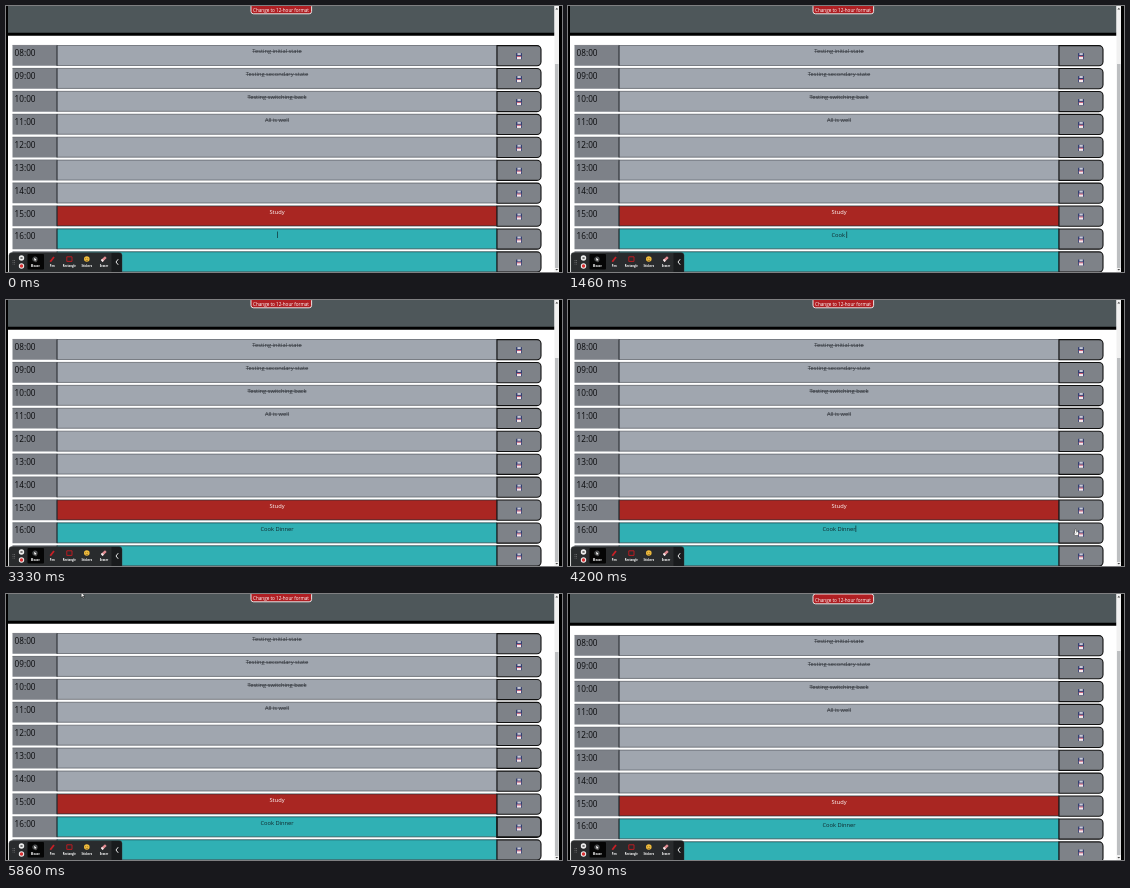
An HTML page with a canvas that plays this animation: 556 px wide and 266 px high, repeating every 8 s.

```html
<!DOCTYPE html>
<html lang="en">
<head>
<meta charset="utf-8">
<title>Day planner</title>
<style>
  html, body { margin: 0; width: 100%; height: 100%; overflow: hidden; background: #000; }
  canvas { display: block; width: 556px; height: 266px; }
</style>
</head>
<body>
<canvas id="stage"></canvas>
<script>
const W = 556, H = 266, LOOP = 8000;
const canvas = document.getElementById('stage');
const ctx = canvas.getContext('2d');
const ratio = window.devicePixelRatio || 1;
canvas.width = W * ratio;
canvas.height = H * ratio;

const FONT = '"Open Sans", sans-serif';
const PITCH = 22.92, ROW_H = 20.6;
const PAST = '#a0a6af', NOW = '#a92622', FUTURE = '#30b0b4';
const notes = ['Testing initial state', 'Testing secondary state', 'Testing switching back',
  'All is well', '', '', '', 'Study'];

// Typing: moment at which each character of the note appears.
const typed = 'Cook Dinner';
const keyTimes = [480, 680, 860, 1060, 1280, 1600, 1800, 2000, 2200, 2400, 2730];
const SAVE_TIME = 4270, SCROLL_TIME = 6500;

// Pointer stops: time, x, y.
const pointerPath = [
  [3530, 330, 234], [4000, 508, 232], [4400, 508, 232], [5700, 76, 0], [7200, 76, 0]
];

function rect(x, y, w, h, fill, stroke, line = 1, radius = 0) {
  ctx.beginPath();
  ctx.roundRect(x, y, w, h, radius);
  if (fill) { ctx.fillStyle = fill; ctx.fill(); }
  if (stroke) { ctx.strokeStyle = stroke; ctx.lineWidth = line; ctx.stroke(); }
}

function circle(x, y, r, fill) {
  ctx.beginPath();
  ctx.arc(x, y, r, 0, Math.PI * 2);
  ctx.fillStyle = fill;
  ctx.fill();
}

function polyline(points, stroke, line, fill) {
  ctx.beginPath();
  points.forEach(([x, y]) => ctx.lineTo(x, y));
  if (fill) { ctx.closePath(); ctx.fillStyle = fill; ctx.fill(); }
  if (stroke) { ctx.strokeStyle = stroke; ctx.lineWidth = line; ctx.stroke(); }
}

function text(str, x, y, size, color, align = 'center', weight = 400) {
  ctx.font = `${weight} ${size}px ${FONT}`;
  ctx.textAlign = align;
  ctx.fillStyle = color;
  ctx.fillText(str, x, y);
  return ctx.measureText(str).width;
}

function floppy(x, y) {
  rect(x - 3, y - 3, 6, 6.2, '#353f70', null, 0, 0.5);
  rect(x - 1.6, y - 3, 3.4, 2, '#c9cad6');
  rect(x - 2.1, y, 4.2, 3.1, '#f3e7ea');
  rect(x - 2.1, y, 4.2, 0.9, '#c8506b');
}

function header() {
  rect(2, -4, 546.5, 31, '#4e575a');
  rect(0, 26.8, 548.5, 3, '#000');
  rect(245, -2, 60.6, 9.8, '#b01f23', '#f4f4f4', 0.9, 2.4);
  text('Change to 12-hour format', 275, 5.6, 4.6, '#fff');
}

function caretVisible(t) {
  if (t >= SAVE_TIME) return false;
  const lastKey = Math.max(0, ...keyTimes.filter(k => k <= t));
  return (t - lastKey) % 1000 < 500;
}

function row(i, t) {
  const y = 39.2 + i * PITCH;
  const fill = i < 7 ? PAST : i === 7 ? NOW : FUTURE;
  rect(6.5, y, 44.5, ROW_H, '#7d8188');
  rect(51, y + 0.3, 440, ROW_H - 0.6, fill, i < 7 ? '#555a61' : '#173338', 0.7);
  polyline([[51, y], [51, y + ROW_H]], '#25282b', 0.8);
  polyline([[6.5, y + 0.2], [51, y + 0.2]], '#5c6067', 0.5);
  text(`${String(8 + i).padStart(2, '0')}:00`, 8.6, y + 10.9, 8.2, '#090a0c', 'left');

  const focused = i === 8 && t >= SAVE_TIME && t < SCROLL_TIME;
  rect(491, y + 0.4, 44, ROW_H - 0.4, '#7e8288', '#111', focused ? 1.6 : 1.1, [0, 4, 4, 0]);
  floppy(513, y + 10.9);

  if (i === 8) {
    const note = typed.slice(0, keyTimes.filter(k => k <= t).length);
    const width = text(note, 271, y + 8, 5.72, '#10272b');
    if (caretVisible(t)) rect(271 + width / 2, y + 2.9, 0.6, 6.6, '#08191b');
  } else if (notes[i]) {
    const past = i < 7;
    const width = text(notes[i], 271, y + 8, 5.72, past ? '#30343a' : '#fff');
    if (past) rect(271 - width / 2, y + 5.8, width, 0.6, '#30343a');
  }
}

function scrollbar(shift) {
  rect(548.5, 0, 4.5, H, '#f1f1f1');
  rect(549, 58 - shift / 2, 3.5, 204, '#bdbfc1');
  polyline([[549.4, 3.4], [550.8, 1.8], [552.2, 3.4]], null, 0, '#444');
  polyline([[549.4, 263], [550.8, 264.6], [552.2, 263]], null, 0, '#444');
  rect(553, 0, 3, H, '#000');
  rect(0, 0, 2, H, '#000');
}

function arrow(x, y, s = 1) {
  const shape = [[0, 0], [0, 5], [1.2, 3.9], [2.1, 5.8], [2.9, 5.4], [2.1, 3.6], [3.7, 3.5]];
  polyline(shape.map(([a, b]) => [x + a * s, y + b * s]), '#111', 0.5, '#fff');
}

function hand(x, y) {
  rect(x - 1.8, y - 0.4, 4.4, 3.8, '#fff', '#222', 0.5, 1.2);
  rect(x - 1, y - 3, 1.3, 4.4, '#fff', '#222', 0.4, 0.6);
  rect(x - 0.9, y - 1, 1.1, 2.5, '#fff');
}

function toolbar() {
  rect(3, 246.6, 113, 22, '#292b2d', '#45484a', 0.5, 3);
  rect(105.5, 247, 10.3, 20, '#191b1d', null, 0, [0, 3, 0, 0]);
  for (let i = 0; i < 6; i++) circle(7 + (i % 2) * 1.6, 254.5 + (i >> 1) * 1.8, 0.45, '#999');
  circle(15.5, 252, 2.7, '#eee');
  polyline([[14.5, 251], [16.5, 253]], '#222', 0.7);
  polyline([[16.5, 251], [14.5, 253]], '#222', 0.7);
  circle(15.5, 260, 2.7, '#eee');
  circle(15.5, 260, 1.7, '#d92f32');

  rect(21.5, 248, 16.5, 15.5, '#050505', null, 0, 1);
  circle(29, 253, 2.6, '#55585a');
  arrow(28, 251, 0.9);
  polyline([[44.3, 255.7], [48, 251]], '#c82026', 1.8);
  rect(60.8, 250.8, 5.2, 4.6, null, '#b81c22', 1);
  circle(80.8, 253, 2.8, '#f2bd3c');
  circle(79.8, 252.4, 0.4, '#543b16');
  circle(81.8, 252.4, 0.4, '#543b16');
  polyline([[79.5, 254], [80.8, 254.7], [82.1, 254]], '#543b16', 0.5);
  polyline([[95.7, 255], [99.8, 251.2]], '#e58d93', 2.4);
  polyline([[95.7, 255], [97, 253.8]], '#eee', 2.4);
  [['Mouse', 29.3], ['Pen', 46.3], ['Rectangle', 63.3], ['Stickers', 80.8], ['Eraser', 98]]
    .forEach(([label, x]) => text(label, x, 260.8, 2.7, '#fff', 'center', 700));
  polyline([[112.2, 253.2], [110, 256], [112.2, 258.8]], '#fff', 0.9);
}

function pointer(t) {
  const next = pointerPath.findIndex(p => p[0] > t);
  if (next < 1) return;
  const [t0, x0, y0] = pointerPath[next - 1], [t1, x1, y1] = pointerPath[next];
  const p = (t - t0) / (t1 - t0), ease = p * p * (3 - 2 * p);
  const x = x0 + (x1 - x0) * ease, y = y0 + (y1 - y0) * ease;
  if (x > 491) hand(x, y); else arrow(x - 0.8, y - 1.5);
}

function draw(t) {
  const shift = t >= SCROLL_TIME ? 2 : 0;
  ctx.setTransform(ratio, 0, 0, ratio, 0, 0);
  rect(0, 0, W, H, '#fff');
  ctx.save();
  ctx.translate(0, shift);
  header();
  for (let i = 0; i < 10; i++) row(i, t);
  ctx.restore();
  scrollbar(shift);
  toolbar();
  pointer(t);
}

const start = performance.now();
function frame() {
  draw((performance.now() - start) % LOOP);
  requestAnimationFrame(frame);
}
frame();
</script>
</body>
</html>
```
